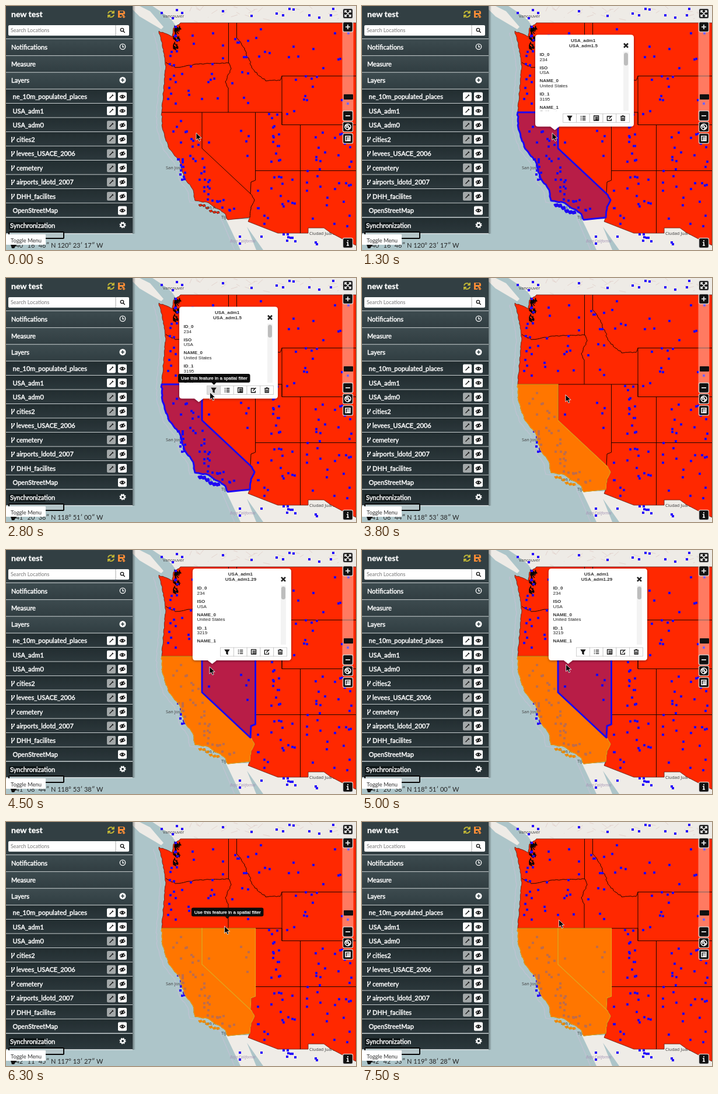
An HTML page that plays this animation: 600x420 px, repeating every 8000 ms.

```html
<!DOCTYPE html>
<html lang="en">
<head>
<meta charset="utf-8">
<title>Spatial filter</title>
<style>
html, body { margin: 0; width: 100%; height: 100%; overflow: hidden; }
svg { display: block; width: 600px; height: 420px; }
text { white-space: pre; }
.lato { font-family: Lato, sans-serif; }
.arial { font: 8px "Liberation Sans", Arial, sans-serif; }
.place { font: 7.4px "Noto Sans", sans-serif; fill: #444; }
.row { font: 11px Lato, sans-serif; fill: #fff; stroke: #fff; stroke-width: .45; }
.bold { font-weight: 700; }
.icon { fill: none; stroke: #111; stroke-width: 1.3; }
.light { stroke: #fff; }
.border { fill: none; stroke: #1b0500; }
.selected { fill: rgb(0 0 255 / .28); stroke: #1c08f5; stroke-width: 3; stroke-linejoin: round; }
.filtered { fill: rgb(255 152 0 / .7); stroke: #e5a01c; stroke-width: 1.2; }
</style>
</head>
<body>
<svg viewBox="0 0 600 420" xmlns="http://www.w3.org/2000/svg">
  <defs>
    <linearGradient id="slate" x2="0" y2="1">
      <stop stop-color="#3d4b4f"/><stop offset="1" stop-color="#303d41"/>
    </linearGradient>
    <linearGradient id="dark" x2="0" y2="1">
      <stop stop-color="#222d30"/><stop offset="1" stop-color="#2c383c"/>
    </linearGradient>
    <linearGradient id="edge">
      <stop stop-color="#000" stop-opacity=".4"/><stop offset="1" stop-color="#000" stop-opacity="0"/>
    </linearGradient>
    <filter id="shadow" x="-10%" y="-10%" width="120%" height="125%">
      <feDropShadow dx="0" dy="1" stdDeviation="2" flood-opacity=".45"/>
    </filter>
    <clipPath id="details"><path d="M0 27H148V131H0Z"/></clipPath>
  </defs>
  <g id="map"></g>
  <g id="overlays"></g>
  <g id="controls"></g>
  <text id="coords" class="lato" x="166.5" y="416" font-size="11" text-anchor="end" fill="#222"></text>
  <g id="sidebar"></g>
  <g id="popup"></g>
  <g id="tip">
    <rect width="123.5" height="15" rx="3" fill="#0b0b0b"/>
    <path d="M57.5 15h8l-4 4z" fill="#0b0b0b"/>
    <text class="arial" x="61.7" y="10.4" text-anchor="middle" fill="#fff" stroke="#fff" stroke-width=".25">Use this feature in a spatial filter</text>
  </g>
  <path id="cursor" d="M0 0V12.2L2.9 9.6 5 14.2 7.2 13.2 5.2 8.8H9.2Z" fill="#000" stroke="#fff" stroke-width=".8"/>
</svg>
<script>
const el = id => document.getElementById(id);
const rect = (x, y, w, h, fill, extra = '') =>
  `<rect x="${x}" y="${y}" width="${w}" height="${h}" fill="${fill}" ${extra}/>`;
const path = (d, attrs) => `<path d="${d}" ${attrs}/>`;
const text = (x, y, str, attrs) => `<text x="${x}" y="${y}" ${attrs}>${str}</text>`;
const at = (x, y, content) => `<g transform="translate(${x} ${y})">${content}</g>`;
const circle = (r, attrs) => `<circle r="${r}" ${attrs}/>`;

let seed = 29;
const random = () => (seed = seed * 16807 % 2147483647) / 2147483647;
const jitter = size => (random() - .5) * size;
const repeat = (n, make) => Array.from({ length: n }, (_, i) => make(i));

// Turns a few key points into a natural, slightly ragged line
function wander(keys, rough) {
  const points = keys.split(' ').map(key => key.split(',').map(Number));
  return points.flatMap(([x, y], i) => {
    if (i === points.length - 1) return [[x, y]];
    const [x2, y2] = points[i + 1];
    const n = Math.ceil(Math.hypot(x2 - x, y2 - y) / 4);
    return repeat(n, k => k
      ? [x + (x2 - x) * k / n + jitter(rough), y + (y2 - y) * k / n + jitter(rough)].map(v => +v.toFixed(1))
      : [x, y]);
  });
}
const line = points => points.join(' ');
const reversed = points => line([...points].reverse());

// Map
const coastCA = wander('267,183 268,210 280,246 297,266 306,296 321,317 324,335 345,338 376,358 380,368', 1.8);
const coastNorth = wander('267,183 270,148 274,104 270,75 262,43', 1.8);
const strait = line(wander('262,43 285,53 287,38 299,29', 2));
const colorado = wander('419,323 426,334 420,346 418,364', 1.5);
const isles = repeat(6, i => `M${330 + i * 6} ${341 + i * 3 + jitter(5)}l5-1 1 3-4 1z`).join('');
const california = `M${line(coastCA)} ${reversed(colorado)} 336,245 336,183Z${isles}`;
const nevada = 'M336 183H427.5V300L420 303 419 323 336 245Z';
const country = `M${strait}H600V412L575 400 556 390 545 382H518V391H466L415 371 418 364 ` +
  `${reversed(coastCA)} ${line(coastNorth)}Z${isles}`;
const columbia = wander('274,97 290,106 330,100 382,98', 1.5);
const snake = wander('382,98 386,108 376,130 381,141', 2);
const divide = wander('396,55 409,73 421,104 431,118 445,129 470,128 473,120', 3);
const borders = `M${line(columbia)}M381.500 29V98L${line(snake)}V183M395.500 29V55L${line(divide)}` +
  'M267 183H473V204.500M600 120.500H473V204.500H600M336 183V245L419 323' +
  `M427.500 183V300L420 303 ${line(colorado)}M427.500 283.500H600M504.500 204.500V391`;

const scatter = (n, x, y, w, h) => repeat(n, () => [x + random() * w, y + random() * h]);
const along = (n, x, y, dx, dy, spread) =>
  repeat(n, i => [x + dx * i / n + jitter(spread), y + dy * i / n + jitter(spread)]);
const towns = [
  ...scatter(14, 252, 2, 320, 22), ...along(16, 288, 40, -4, 135, 14), ...scatter(16, 300, 40, 76, 140),
  ...scatter(14, 386, 50, 75, 125), ...scatter(24, 430, 38, 166, 160), ...scatter(5, 345, 200, 72, 60),
  ...along(14, 462, 190, 4, 90, 24), ...scatter(34, 510, 210, 84, 170), ...scatter(18, 430, 292, 66, 86),
  ...along(24, 295, 200, 65, 130, 22), ...along(14, 298, 262, 6, 38, 10), ...along(12, 345, 325, 45, 25, 14),
  ...scatter(12, 390, 392, 150, 20)
];
const squares = towns.map(([x, y]) => `M${Math.round(x) - 2} ${Math.round(y) - 2}h4v4h-4z`).join('');
const inlets = scatter(34, 286, 33, 12, 38).map(([x, y]) => `M${x} ${y}l${jitter(4)} 4 2 2`).join('');
const roads = scatter(28, 300, 2, 290, 24).map(([x, y]) => `M${x} ${y}l${jitter(28)} ${jitter(16)}`).join('');

el('map').innerHTML = rect(0, 0, 600, 420, '#adc5c9') +
  path('M217 0H229L247 9 270 36 266 40 229 18 217 6ZM251 0H600V29H299L291 34 284 24 266 10Z', 'fill="#eeebe6"') +
  path('M377 367H600V420H441L413 380 429 420H402L386 386Z', 'fill="#efece7"') +
  path(roads, 'fill="none" stroke="#dec9c3" stroke-width=".7"') +
  path(`M${reversed(coastNorth)} ${line(coastCA)} 402,420`,
    'transform="translate(-9 3)" fill="none" stroke="#bfc3d2" stroke-width="1.3"') +
  text(287, 20, 'Vancouver', 'class="place" text-anchor="middle"') +
  text(274, 281, 'San José', 'class="place"') +
  text(369, 366, 'Tijuana', 'class="place"') +
  text(384, 407, 'Baja California', 'class="place" style="font-size:6.6px;font-style:italic;fill:#a393b5"') +
  text(520, 394, 'Ciudad Juárez', 'class="place"') +
  path(country, 'fill="#ff2800" stroke="#5a1a0c" stroke-width=".8"') +
  text(341, 349, 'Los A', 'class="place"') +
  path(borders, 'class="border"') +
  path(inlets, 'fill="none" stroke="#090303" stroke-width="1.5"') +
  path(squares, 'fill="#2608fb"');

el('overlays').innerHTML = path(california, 'id="ca"') + path(nevada, 'id="nv"');

// Map controls
const control = (y, icon) => at(586, y,
  rect(-8.5, -8.5, 17, 17, '#111', 'rx="2.5" stroke="#eee" stroke-opacity=".75" stroke-width="1.5"') +
  path(icon, 'fill="none" stroke="#fff" stroke-width="1.6"'));
const sheet = 'M-4-4H4V4H-4ZM-2-1.500H3M-2 .500H3M-2 2.500H3';
el('controls').innerHTML = rect(576.5, 27, 19, 171, '#fff', 'rx="3" fill-opacity=".38"') +
  control(13, 'M-5-1.500V-5H-1.500M1.500-5H5V-1.500M5 1.500V5H1.500M-1.500 5H-5V1.500M-5-5 5 5M5-5-5 5') +
  control(36, 'M-4 0H4M0-4V4') + control(189, 'M-4 0H4') +
  rect(579, 152, 16, 9, '#111', 'rx="1"') +
  control(208, 'M-5 0A5 5 0 1 0 5 0A5 5 0 1 0-5 0M-3-2 0-3 1 0-2 1ZM2 1 4 2 1 4Z') +
  control(228, sheet) + control(408, 'M0-5V-3M-2-1H0V4M-2 4H2');

// Sidebar
const eye = 'M-4.500 0Q0-5 4.500 0Q0 5-4.500 0M-1 0A1 1 0 1 0 1 0A1 1 0 1 0-1 0';
const pencil = 'M-3 3 2.500-2.500M1.500-3.500 3.500-1.500';
const fork = path('M-2-3V4M-2 2Q2 1 2-3', 'class="icon light"') +
  path('M-3-4h2v2h-2zM1-4h2v2h-2zM-3 3h2v2h-2z', 'fill="#fff"');
const button = (x, y, icon, fill = '#fff') =>
  at(x, y, rect(-7.5, -7.5, 15, 15, fill, 'rx="2"') + path(icon, 'class="icon"'));
const rule = y => rect(0, y - .9, 217, 1.5, '#dbe0e1');
const band = (y, h, shade) => rect(0, y, 217, h, `url(#${shade})`) + rule(y + h);
const layers = ['ne_10m_populated_places', 'USA_adm1', 'USA_adm0', 'cities2', 'levees_USACE_2006',
  'cemetery', 'airports_ldotd_2007', 'DHH_facilites', 'OpenStreetMap'];
const layerRow = (name, i) => {
  const y = 156 + i * 24.5;
  const base = i === layers.length - 1;
  const shown = base || i < 2;
  const forked = !base && i > 2;
  return band(y - 12.5, 24.5, 'dark') + text(forked ? 18 : 11.5, y + 4, name, 'class="row"') +
    (forked ? at(12, y, fork) : '') +
    (base ? '' : button(180.5, y, pencil, shown ? '#fff' : '#a3a8a9')) +
    button(199.5, y, shown ? eye : eye + 'M-3 4 3-4');
};
el('sidebar').innerHTML = rect(217, 0, 5, 392, 'url(#edge)') +
  rect(0, 0, 217, 57, '#323f43') + rule(57) +
  text(9, 19, 'new test', 'class="lato bold" font-size="14" fill="#fff" stroke="#fff" stroke-width=".3"') +
  at(180, 14, path('M-5-1A5 5 0 0 1 4-3M5 1A5 5 0 0 1-4 3M5-6V-2H1M-5 6V2H-1', 'fill="none" stroke="#c4b936" stroke-width="1.8"')) +
  at(198, 14, path('M-6-6H4L6-4V0H3V3H0V6H-6ZM-3-5V-2H3V-5ZM-3 1H1V4H-3ZM3 1H5V4H7L4 7 1 4H3Z', 'fill="#f58b36" fill-rule="evenodd"')) +
  rect(4, 33, 207, 18, '#fff', 'rx="2"') + rect(187.5, 33, 1, 18, '#aaa') +
  text(8, 45, 'Search Locations', 'class="lato" font-size="9" fill="#777"') +
  at(199, 41, circle(2.7, 'class="icon"') + path('M2 2 4.700 5', 'class="icon"')) +
  ['Notifications', 'Measure', 'Layers'].map((name, i) =>
    band(57 + i * 28.8, 28.8, 'slate') + text(9, 75 + i * 28.7, name, 'class="row"')).join('') +
  at(200, 70, circle(4.7, 'class="icon light"') + path('M0-3V.500H2.500', 'class="icon light"')) +
  at(200, 127.5, circle(5.5, 'fill="#fff"') + path('M-3 0H3M0-3V3', 'stroke="#344246" stroke-width="1.7"')) +
  layers.map(layerRow).join('') +
  band(364.5, 27.5, 'dark') +
  rect(5, 372, 63, 13, '#0c1213', 'fill-opacity=".8" rx="2"') +
  rect(5, 389, 94, 11, '#b5c5c8', 'stroke="#080808" stroke-width="2" rx="1"') +
  text(7, 382, 'Synchronization', 'class="row"') +
  at(200, 377, circle(3.2, 'fill="none" stroke="#fff" stroke-width="2.400"') +
    circle(4.7, 'fill="none" stroke="#fff" stroke-width="1.800" stroke-dasharray="1.850"')) +
  path('M8 411H18L14 417H10Z', 'fill="#111"') +
  rect(0, 393, 68, 18, '#fff', 'rx="1"') +
  text(8, 406.5, 'Toggle Menu', 'class="lato" font-size="9.4" fill="#333"');

// Feature popup
const bullets = [-3, 0, 3].map(y => `M-4 ${y}H-2.500M-1 ${y}H4.500`).join('');
const tools = ['M-3.500-3.500H3.500L1 0V4L-1 3V0Z', bullets, sheet,
  'M2-3H-4V4H3V1M-1 1 4-4', 'M-3-2.500V4H3V-2.500M-4-3H4M-1.500-4H1.500M-1-1V3M1-1V3'];
const fields = { ID_0: 234, ISO: 'USA', NAME_0: 'United States', ID_1: '', NAME_1: '' };
el('popup').innerHTML =
  path('M5 0H164Q169 0 169 5V153Q169 158 164 158H41L33.500 164 26 158H5Q0 158 0 153V5Q0 0 5 0Z', 'fill="#fff" filter="url(#shadow)"') +
  text(82, 12.5, 'USA_adm1', 'class="arial bold" text-anchor="middle" fill="#333"') +
  text(82.5, 21, '', 'id="feature" class="arial bold" text-anchor="middle" fill="#333"') +
  path('M152 15 159 22M159 15 152 22', 'stroke="#222" stroke-width="2.600"') +
  '<g clip-path="url(#details)">' + Object.entries(fields).map(([name, value], i) =>
    text(7.5, 36.5 + i * 22.7, name, 'class="arial bold" fill="#333"') +
    text(7.5, 45 + i * 22.7, value, `class="arial" fill="#222" id="${name}"`)).join('') + '</g>' +
  rect(151, 29, 9, 102, '#f3f3f3') + rect(152, 31, 7, 22, '#bdbdbd', 'rx="3.500"') +
  tools.map((icon, i) => at(59 + i * 22.8, 143.5,
    rect(-11.4, -7.5, 22.8, 15, '#fff', `stroke="#c4c4c4" stroke-width=".8" ${i ? '' : 'id="filterTool"'}`) +
    path(icon, `class="icon" ${i ? '' : 'style="fill:#222"'}`))).join('');

// Cursor positions are whole map pixels east and north of the first click
const screen = (east, up) => [326 + east * .675, 218.5 - up * .675];
const degrees = (value, suffix) => {
  const total = Math.round(value * 3600);
  const two = n => String(n % 60).padStart(2, '0');
  return `${Math.floor(total / 3600)}° ${two(Math.floor(total / 60))}′ ${two(total)}″ ${suffix}`;
};
// Web Mercator at zoom level 5
const mapWidth = 256 * 2 ** 5;
const coordinates = (east, up) => {
  const lat = Math.atan(Math.sinh((1003 + up) * 2 * Math.PI / mapWidth)) * 180 / Math.PI;
  return `${degrees(lat, 'N')} ${degrees(120.3881 - east * 360 / mapWidth, 'W')}`;
};

const features = {
  ca: { click: [0, 0], id: 'USA_adm1.5', code: 3195, name: 'California' },
  nv: { click: [34, 26], id: 'USA_adm1.29', code: 3219, name: 'Nevada' }
};
// Start, east, up, then only what changes
const steps = [
  [0, 0, 0, { ca: '', nv: '', feature: 'ca', open: false, tip: false, hover: false }],
  [1300, 0, 0, { ca: 'selected', open: true }],
  [1800, 18, 11],
  [2000, 50, 29, { hover: true }],
  [2300, 58, 32, { tip: true }],
  [2500, 41, 32],
  [2800, 35, 32],
  [3000, 35, 32, { ca: 'filtered', open: false, hover: false }],
  [3300, 35, 29, { tip: false }],
  [3500, 34, 26],
  [4500, 34, 26, { nv: 'selected', feature: 'nv', open: true }],
  [5000, 35, 32],
  [5300, 59, 53, { hover: true }],
  [5500, 80, 61, { tip: true }],
  [5800, 81, 58],
  [6000, 72, 58],
  [6300, 72, 58, { nv: 'filtered', open: false, hover: false }],
  [6500, 65, 61, { tip: false }],
  [6800, 49, 70],
  [7000, 28, 70],
  [7300, 18, 74],
  [7500, 17, 74]
];
let state = {};
const scenes = steps.map(([start, east, up, change]) =>
  ({ start, east, up, ...(state = { ...state, ...change }) }));
const show = (id, on) => el(id).setAttribute('visibility', on ? 'visible' : 'hidden');
const move = (id, x, y) => el(id).setAttribute('transform', `translate(${x} ${y})`);

function render(scene) {
  move('cursor', ...screen(scene.east, scene.up));
  el('coords').textContent = coordinates(scene.east, scene.up);
  for (const id of ['ca', 'nv']) {
    el(id).setAttribute('class', scene[id]);
    show(id, scene[id]);
  }
  const { click, id, code, name } = features[scene.feature];
  const [x, y] = screen(...click);
  move('popup', x - 29, y - 169);
  move('tip', x - 31, y - 53.5);
  show('popup', scene.open);
  show('tip', scene.tip);
  el('feature').textContent = id;
  el('ID_1').textContent = code;
  el('NAME_1').textContent = name;
  el('filterTool').setAttribute('fill', scene.hover ? '#dedede' : '#fff');
}

let current;
const origin = performance.now();
function tick() {
  const time = (performance.now() - origin) % 8000;
  const scene = scenes.findLast(s => s.start <= time);
  if (scene !== current) render(current = scene);
  requestAnimationFrame(tick);
}
tick();
</script>
</body>
</html>
```
